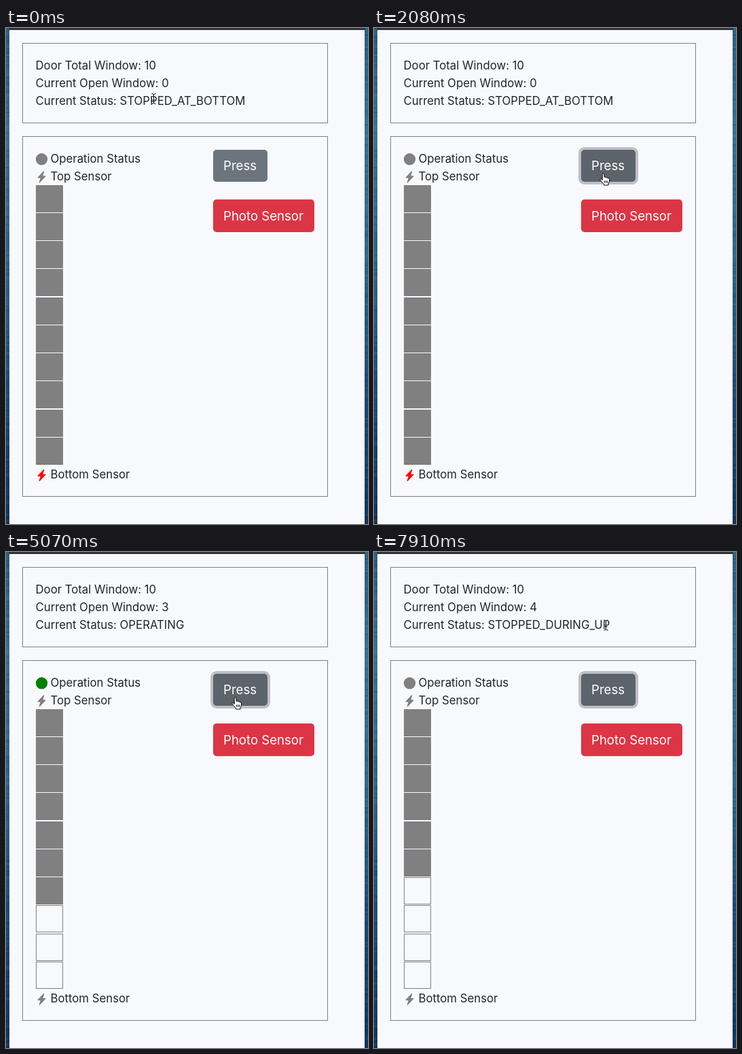
Write an HTML page that moves like this. It is 533 px wide and 729 px high and loops after 8000 ms.

```html
<!DOCTYPE html>
<html lang="en">
<head>
<meta charset="utf-8">
<title>Door control panel</title>
<style>
  html, body { margin: 0; width: 100%; height: 100%; overflow: hidden; background: #f8f9fc; }
  svg { display: block; width: 100vw; height: 100vh; }
  text { font: 16.75px Inter, "Liberation Sans", sans-serif; fill: #212529; white-space: pre; }
  .label { font-size: 18.6px; fill: #fff; }
  .frame { fill: none; stroke: #808080; }
</style>
</head>
<body>
<svg viewBox="0 0 533 729" preserveAspectRatio="none">
  <defs>
    <linearGradient id="sea" x2="0" y2="1">
      <stop offset="0" stop-color="#2b5c7c"/>
      <stop offset=".2" stop-color="#357390"/>
      <stop offset=".5" stop-color="#2a6489"/>
      <stop offset=".75" stop-color="#1b4775"/>
      <stop offset="1" stop-color="#12345c"/>
    </linearGradient>
    <path id="bolt" transform="scale(1.085)" d="M11.251.068a.5.5 0 0 1 .227.58L9.677 6.5H13a.5.5 0 0 1 .364.843l-8 8.5a.5.5 0 0 1-.842-.49L6.323 9.5H3a.5.5 0 0 1-.364-.843l8-8.5a.5.5 0 0 1 .615-.09z"/>
    <path id="stem" d="M-2.7-7.5Q0-7.5 0-5.5Q0-7.5 2.7-7.5M0-5.5V5.5M-2.7 7.5Q0 7.5 0 5.5Q0 7.5 2.7 7.5M-1.6 2H1.6"/>
  </defs>
  <rect width="533" height="729" fill="url(#sea)"/>
  <g id="texture"></g>
  <rect x="5" width="523" height="729" fill="#f8f9fc"/>
  <rect x="4" width="525" height="3" fill="#33333b"/>
  <rect class="frame" x="24.5" y="22.5" width="449" height="117"/>
  <rect class="frame" x="24.5" y="159.5" width="449" height="529"/>

  <rect id="selection" x="212" y="94" height="26" fill="#b3d7ff"/>
  <text x="43.5" y="61">Door Total Window: 10</text>
  <text x="43.5" y="87" id="count"></text>
  <text x="43.5" y="113" id="status"></text>

  <circle id="lamp" cx="52.5" cy="192.8" r="8.7"/>
  <text x="65.5" y="198">Operation Status</text>
  <use href="#bolt" x="43.8" y="210.2" fill="#808080"/>
  <text x="65.5" y="224">Top Sensor</text>
  <g id="windows"></g>
  <use href="#bolt" x="43.8" y="648.7" id="bottom"/>
  <text x="65.5" y="662">Bottom Sensor</text>

  <rect id="ring" fill="#bcc0c6"/>
  <rect id="press" x="305" y="179" width="80" height="47" rx="5"/>
  <text class="label" x="320" y="209">Press</text>
  <rect x="305" y="252" width="149" height="48" rx="5" fill="#dc3545"/>
  <text class="label" x="320" y="283">Photo Sensor</text>

  <g id="beam" fill="none" stroke-linecap="round">
    <use href="#stem" stroke="#fff" stroke-width="2" stroke-opacity=".7"/>
    <use href="#stem" stroke="#000"/>
  </g>
  <path id="hand" fill="#fff" stroke="#000" stroke-linejoin="round" d="M4.2 10.5V2.3Q4.2.7 5.4.7Q6.7.7 6.8 2.3L7.2 6.3Q8.9 5.3 9.6 6.9Q11.2 6 12 7.5Q14.6 7 14.6 9.4V12Q14.2 14.3 13 15.5V18H6.5V16.5Q3.8 14 1.2 10.6Q.4 9 1.7 8.6Q3 8.5 4.2 10.5ZM7.6 11.5V14.7M9.7 11.5V14.7M11.7 11.5V14.7"/>
  <path id="arrow" fill="#000" stroke="#fff" d="M.6.8V14.2L3.7 11.4L5.8 16.3L8.2 15.3L6.1 10.6H10.5Z"/>
</svg>
<script>
  const LOOP = 8000;
  const $ = id => document.getElementById(id);
  const set = (el, attrs) => { for (const k in attrs) el.setAttribute(k, attrs[k]); };
  const add = (parent, tag, attrs) => {
    const el = document.createElementNS("http://www.w3.org/2000/svg", tag);
    set(el, attrs);
    return parent.appendChild(el);
  };

  // [start time, value...] steps; each holds until the next
  const pointer = [
    [0, "beam", 217.5, 104], [150, "beam", 215.5, 104], [300, "beam", 231.5, 104],
    [450, "beam", 292.5, 104], [600, "beam", 316.5, 103.5], [900, "beam", 327.5, 104.5],
    [1050, "beam", 338.5, 106], [1340, "beam", 338.5, 123.5], [1490, "hand", 330, 212],
    [1640, "hand", 330, 215], [1780, "hand", 332, 215], [1930, "hand", 332, 213],
    [7320, "arrow", 274, 122], [7460, "beam", 240.5, 106.5], [7610, "beam", 271.5, 107.5],
    [7760, "beam", 322, 108], [7910, "beam", 341.5, 107.5]
  ];
  const selectionEnd = [[0, 212], [300, 223], [450, 279], [600, 314], [1200, 212]];
  const openCount = [[0, 0], [3130, 1], [4030, 2], [5070, 3], [5970, 4]];
  const status = [[0, "STOPPED_AT_BOTTOM"], [3130, "OPERATING"], [6420, "STOPPED_DURING_UP"]];
  const button = [[0, "#6c757d", 0], [1640, "#5c636a", 0], [1930, "#565e64", 1], [2080, "#5c636a", 4]];
  const at = (steps, t) => steps.filter(s => s[0] <= t).pop().slice(1);

  let seed = 7;
  const random = () => (seed = seed * 16807 % 2147483647) / 2147483647;
  for (const x of [0, 528])
    for (let y = 0; y < 729; y += 3)
      add($("texture"), "rect", {
        x, y, width: 5, height: 1 + 2 * random(),
        fill: random() < .5 ? "#0a2a4c" : "#5d9ab5", opacity: .16 * random()
      });

  const panes = Array.from({ length: 10 }, (_, i) =>
    add($("windows"), "rect", { x: 44.5, y: Math.round(230.7 + 41.25 * i) + .5, width: 39, height: 39, stroke: "#808080" }));

  function render(t) {
    const [open] = at(openCount, t);
    const [state] = at(status, t);
    const [color, spread] = at(button, t);
    const [kind, x, y] = at(pointer, t);

    $("count").textContent = "Current Open Window: " + open;
    $("status").textContent = "Current Status: " + state;
    set($("selection"), { width: at(selectionEnd, t)[0] - 212 });
    set($("lamp"), { fill: state === "OPERATING" ? "#008000" : "#808080" });
    set($("bottom"), { fill: open ? "#808080" : "#f00" });
    panes.forEach((pane, i) => set(pane, { fill: i < 10 - open ? "#808080" : "none" }));

    set($("press"), { fill: color });
    set($("ring"), {
      x: 305 - spread, y: 179 - spread, rx: 5 + spread,
      width: 80 + 2 * spread, height: 47 + 2 * spread
    });
    for (const id of ["beam", "hand", "arrow"])
      set($(id), { visibility: id === kind ? "visible" : "hidden", transform: `translate(${x} ${y})` });
  }

  const start = performance.now();
  (function tick() {
    render((performance.now() - start) % LOOP);
    requestAnimationFrame(tick);
  })();
</script>
</body>
</html>
```
